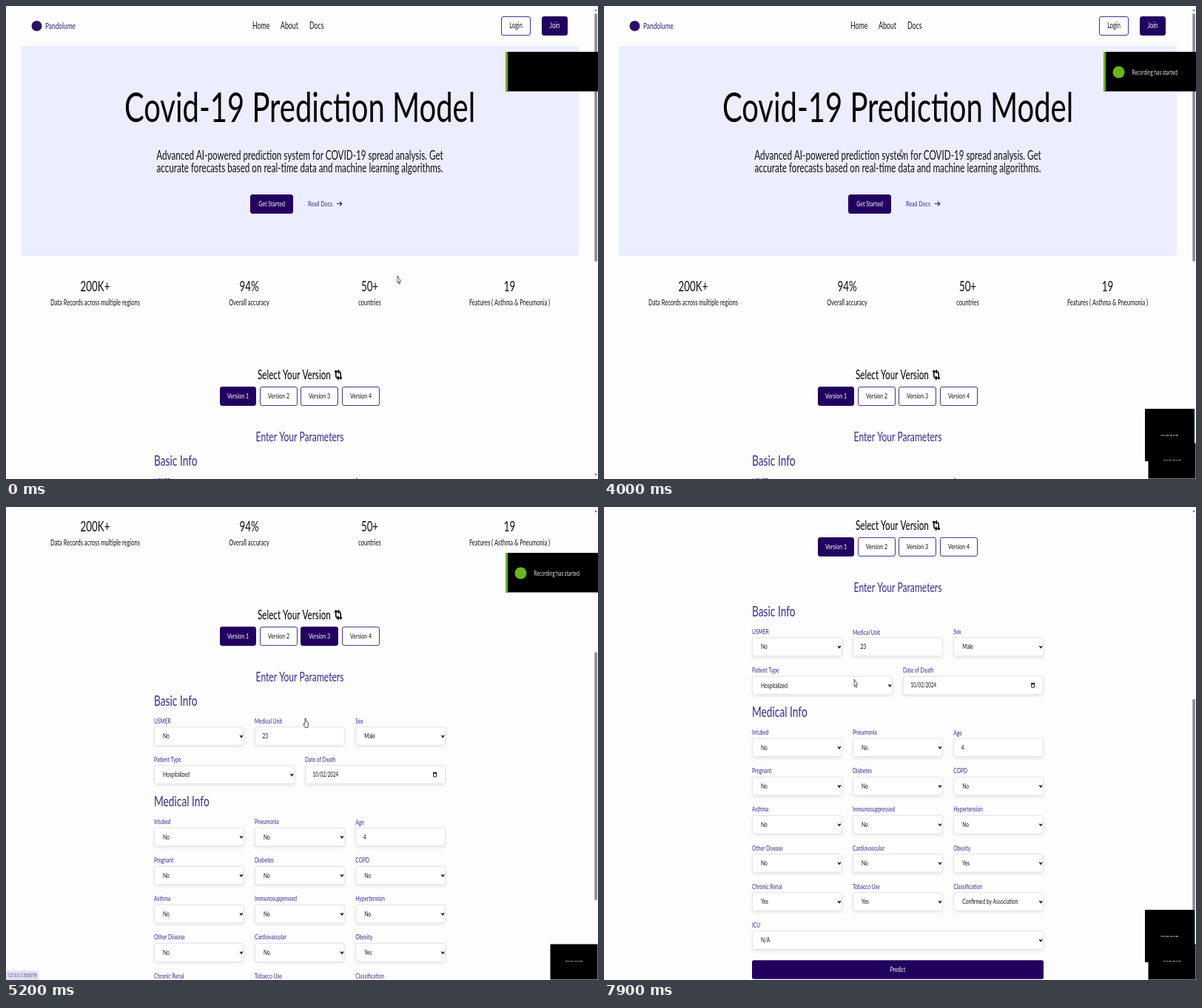
An HTML page with a canvas for the animation above (8 s loop, 800 by 640 pixels).

```html
<!DOCTYPE html>
<html lang="en">
<head>
<meta charset="utf-8">
<title>Prediction model</title>
<style>
html, body { margin: 0; width: 100%; height: 100%; overflow: hidden; background: #fdfdfd; }
canvas { display: block; width: 800px; height: 640px; }
</style>
</head>
<body>
<canvas id="stage" width="800" height="640"></canvas>
<script>
const ctx = document.getElementById('stage').getContext('2d');
const LOOP = 8000, STEP = 100;
// The page is a 1920 x 1080 screen squeezed onto the stage.
const SX = 800 / 1920, SY = 640 / 1080;
const NOTCH = 100 * SY;
const INK = '#111116', DARK = '#22005f', VIOLET = '#382a92', GREEN = '#69b61c';
const PAGE_FONT = 'Lato, sans-serif', UI_FONT = '"Open Sans", sans-serif';

// [time, x, y]
const POINTER = [
  [1100, 529, 365], [1300, 553, 358], [1700, 553, 358], [2200, 588, 288],
  [2500, 585, 294], [2700, 585, 294], [3500, 425, 140], [3700, 412, 190],
  [4000, 401, 194], [4400, 403, 286], [5400, 403, 286], [6200, 281, 131],
  [6300, 281, 131], [6700, 383, 250], [7100, 350, 315], [7200, 349, 318],
  [7300, 349, 318], [7500, 338, 233]
];
// [time, wheel notches]
const SCROLL = [
  [4450, 0], [4800, 3], [4900, 3], [5000, 4], [5200, 5.96], [5300, 6],
  [5450, 6], [5900, 9], [7650, 9], [7850, 8]
];

function track(keys, t, i = 1) {
  if (t <= keys[0][0]) return keys[0][i];
  for (let k = 1; k < keys.length; k++) {
    const a = keys[k - 1], b = keys[k];
    if (t <= b[0]) return a[i] + (b[i] - a[i]) * (t - a[0]) / (b[0] - a[0]);
  }
  return keys[keys.length - 1][i];
}

// y is the middle of the capitals; size is in screen pixels
function text(str, x, y, size, color = INK, align = 'left', font = PAGE_FONT, weight = 400) {
  ctx.save();
  ctx.translate(x, y + size * 0.36 * SY);
  ctx.scale(SX, SY);
  ctx.font = `${weight} ${size}px ${font}`;
  ctx.textAlign = align;
  ctx.fillStyle = color;
  ctx.fillText(str, 0, 0);
  ctx.restore();
}

function box(x, y, w, h, r, fill, stroke) {
  ctx.beginPath();
  ctx.roundRect(x, y, w, h, r);
  if (fill) { ctx.fillStyle = fill; ctx.fill(); }
  if (stroke) { ctx.strokeStyle = stroke; ctx.lineWidth = 1; ctx.stroke(); }
}

function line(points, color, width) {
  ctx.beginPath();
  points.forEach(([x, y]) => ctx.lineTo(x, y));
  ctx.strokeStyle = color;
  ctx.lineWidth = width;
  ctx.stroke();
}

function dot(x, y, r, color) {
  ctx.beginPath();
  ctx.arc(x, y, r, 0, 7);
  ctx.fillStyle = color;
  ctx.fill();
}

function button(label, x, y, w, h, solid, size = 17) {
  box(x + 0.5, y + 0.5, w - 1, h - 1, 2.5, solid ? DARK : '#fff', solid ? DARK : '#43348f');
  text(label, x + w / 2, y + h / 2 - 0.5, size, solid ? '#fff' : INK, 'center');
}

function field(label, value, x, labelY, w, kind = 'select') {
  const y = labelY + 20.5, input = kind !== 'select';
  text(label, x, labelY + (kind === 'input' ? 0.7 : 0), 16, VIOLET);
  ctx.save();
  ctx.shadowColor = 'rgba(0,0,0,.10)';
  ctx.shadowBlur = 5;
  ctx.shadowOffsetY = 2;
  box(x + 0.5, y - 12, w - 1, 24.5, 2, '#fff');
  ctx.restore();
  box(x + 0.5, y - 12, w - 1, 24.5, 2, null, '#e4e4e9');
  text(value, x + (input ? 10.5 : 12), y, kind === 'date' ? 15 : 16);
  const r = x + w;
  if (kind === 'select') line([[r - 5.5, y - 1], [r - 3.7, y + 1.6], [r - 1.9, y - 1]], '#111', 1.4);
  if (kind === 'date') {
    box(r - 16.3, y - 2.5, 4, 5.5, 0.5, null, '#111');
    ctx.fillStyle = '#111';
    ctx.fillRect(r - 16.8, y - 3.2, 5, 2);
  }
}

function swapIcon(x, y) {
  line([[x + 1.8, y + 2], [x + 1.8, y + 9], [x + 3, y + 11.3], [x + 5, y + 11.3]], '#000', 1.5);
  line([[x + 8.2, y + 12], [x + 8.2, y + 5], [x + 7, y + 2.7], [x + 5, y + 2.7]], '#000', 1.5);
  line([[x + 4.3, y + 8.8], [x + 5.6, y + 11.3], [x + 4.3, y + 13.8]], '#000', 1.6);
  line([[x + 5.7, y + 0.2], [x + 4.4, y + 2.7], [x + 5.7, y + 5.2]], '#000', 1.6);
  dot(x + 1.8, y + 2.6, 1.8, '#000');
  dot(x + 8.2, y + 11.4, 1.8, '#000');
}

function drawIntro() {
  dot(41.5, 27, 7, '#2b1068');
  text('Pandolume', 53, 27, 20, '#2b1a70');
  [['Home', 333], ['About', 371], ['Docs', 410]].forEach(([s, x]) => text(s, x, 27, 21));
  button('Login', 669, 14, 40, 26, false, 18);
  button('Join', 724, 14, 35, 26, true, 18);

  box(20, 54, 754, 284, 3, '#ecedfe');
  text('Covid-19 Prediction Model', 397, 136.5, 96, '#000', 'center');
  text('Advanced AI-powered prediction system for COVID-19 spread analysis. Get', 397, 202.5, 28, INK, 'center');
  text('accurate forecasts based on real-time data and machine learning algorithms.', 397, 218.7, 28, INK, 'center');
  button('Get Started', 330, 255, 58, 26, true);
  text('Read Docs', 408, 267.5, 17, VIOLET);
  line([[447, 267.5], [453.5, 267.5]], VIOLET, 1.2);
  line([[451, 264.8], [453.8, 267.5], [451, 270.2]], VIOLET, 1.2);

  [['200K+', 'Data Records across multiple regions', 120.5],
   ['94%', 'Overall accuracy', 328.5],
   ['50+', 'countries', 491.5],
   ['19', 'Features ( Asthma & Pneumonia )', 680.5]].forEach(([n, s, x]) => {
    text(n, x, 379.5, 32, INK, 'center');
    text(s, x, 401, 18, INK, 'center');
  });
}

function drawForm(hover) {
  text('Select Your Version', 340, 499, 28, '#000');
  swapIcon(444, 492);
  [[289, 49], [343, 51], [398, 51], [454, 51]].forEach(([x, w], i) =>
    button('Version ' + (i + 1), x, 515, w, 26, i === 0 || (hover && i === 2)));

  text('Enter Your Parameters', 397, 583.3, 29, VIOLET, 'center');
  text('Basic Info', 200, 615, 33, VIOLET);
  const cols = [200, 336, 472.3], third = 121.7;
  field('USMER', 'No', cols[0], 642.5, third);
  field('Medical Unit', '23', cols[1], 642.5, third, 'input');
  field('Sex', 'Male', cols[2], 642.5, third);
  field('Patient Type', 'Hospitalized', 200, 694.7, 190);
  field('Date of Death', '10/02/2024', 404, 694.7, 190, 'date');

  text('Medical Info', 200, 751, 33, VIOLET);
  const labels = ['Intubed', 'Pneumonia', 'Age', 'Pregnant', 'Diabetes', 'COPD',
    'Asthma', 'Immunosuppressed', 'Hypertension', 'Other Disease', 'Cardiovascular',
    'Obesity', 'Chronic Renal', 'Tobacco Use', 'Classification'];
  const values = { Age: '4', Obesity: 'Yes', 'Chronic Renal': 'Yes', 'Tobacco Use': 'Yes',
    Classification: 'Confirmed by Association' };
  labels.forEach((s, i) => field(s, values[s] || 'No', cols[i % 3],
    778.8 + 52.15 * Math.floor(i / 3), third, s === 'Age' ? 'input' : 'select'));
  field('ICU', 'N/A', 200, 1039.6, 394);
  box(200, 1087.3, 394, 25.5, 2.5, DARK);
  text('Predict', 397, 1100, 16, '#fff', 'center');
  text('© 2025 QEVU. All rights reserved.', 20, 1173, 15);
}

function drawScrollbar(scroll) {
  ctx.fillStyle = '#fafafa';
  ctx.fillRect(794, 0, 6, 640);
  box(795.3, 10 + scroll * 0.527, 3.6, 336, 1.8, '#8c8c8c');
  ctx.fillStyle = '#777';
  for (const [y, d] of [[7, -3], [633, 3]]) {
    ctx.beginPath();
    ctx.moveTo(795.3, y);
    ctx.lineTo(798.7, y);
    ctx.lineTo(797, y + d);
    ctx.fill();
  }
}

function drawToast(t) {
  const shift = track([[5500, 0], [6000, 126]], t);
  if (shift >= 126) return;
  ctx.save();
  ctx.translate(shift, 0);
  ctx.fillStyle = '#000';
  ctx.fillRect(675, 62, 125, 53.5);
  ctx.fillStyle = GREEN;
  ctx.fillRect(675, 62, 3, 53.5);
  ctx.globalAlpha = track([[100, 0], [500, 1]], t);
  dot(695.5, 89.5, 8, GREEN);
  text('Recording has started', 713.5, 90, 14.5, '#fff', 'left', UI_FONT);
  ctx.restore();
}

function overlay(x, y, w, h, textX, textY, color) {
  ctx.fillStyle = '#000';
  ctx.fillRect(x, y, w, h);
  ctx.save();
  ctx.setLineDash([3, 1, 2, 1, 4, 1.5]);
  line([[textX, textY], [textX + 24, textY]], color, 1);
  ctx.restore();
}

function drawPointer(x, y, hand) {
  ctx.save();
  ctx.translate(x, y);
  ctx.beginPath();
  const shape = hand
    ? [[1, 0], [2.3, 0], [2.5, 4.5], [5, 5.2], [5.6, 7], [4.9, 12.5], [1.3, 12.5], [-1.2, 8.3], [-0.8, 7], [0.8, 8.5]]
    : [[0, 0], [0, 9.6], [1.4, 8], [2.5, 11.4], [3.6, 10.7], [2.6, 7.4], [4.5, 7.2]];
  shape.forEach(([px, py]) => ctx.lineTo(px, py));
  ctx.closePath();
  ctx.fillStyle = '#fff';
  ctx.fill();
  ctx.strokeStyle = '#333';
  ctx.lineWidth = 0.8;
  ctx.stroke();
  ctx.restore();
}

function draw(t) {
  const scroll = track(SCROLL, t) * NOTCH;
  const hover = t >= 5000 && t < 5400;
  ctx.fillStyle = '#fdfdfd';
  ctx.fillRect(0, 0, 800, 640);
  ctx.save();
  ctx.translate(0, -scroll);
  drawIntro();
  drawForm(hover);
  ctx.restore();
  drawScrollbar(scroll);

  if (t >= 5000 && t < 5700) {
    box(-2, 627.5, 46, 15, 2, '#dfdcf3');
    text('127.0.0.1:5000/?#', 2, 634, 11.5, '#4a4760', 'left', UI_FONT);
  }
  drawToast(t);
  if ((t >= 2700 && t < 4600) || t >= 5500) overlay(731, 545, 67, 71, 752.5, 581, '#ddd');
  if (t >= 2600) overlay(735.5, 591.5, 64, 48, 756, 614.5, '#999');
  drawPointer(track(POINTER, t), track(POINTER, t, 2), hover);
}

const start = performance.now();
function tick() {
  const t = (performance.now() - start) % LOOP;
  draw(Math.floor(t / STEP) * STEP);
  requestAnimationFrame(tick);
}
tick();
</script>
</body>
</html>
```
